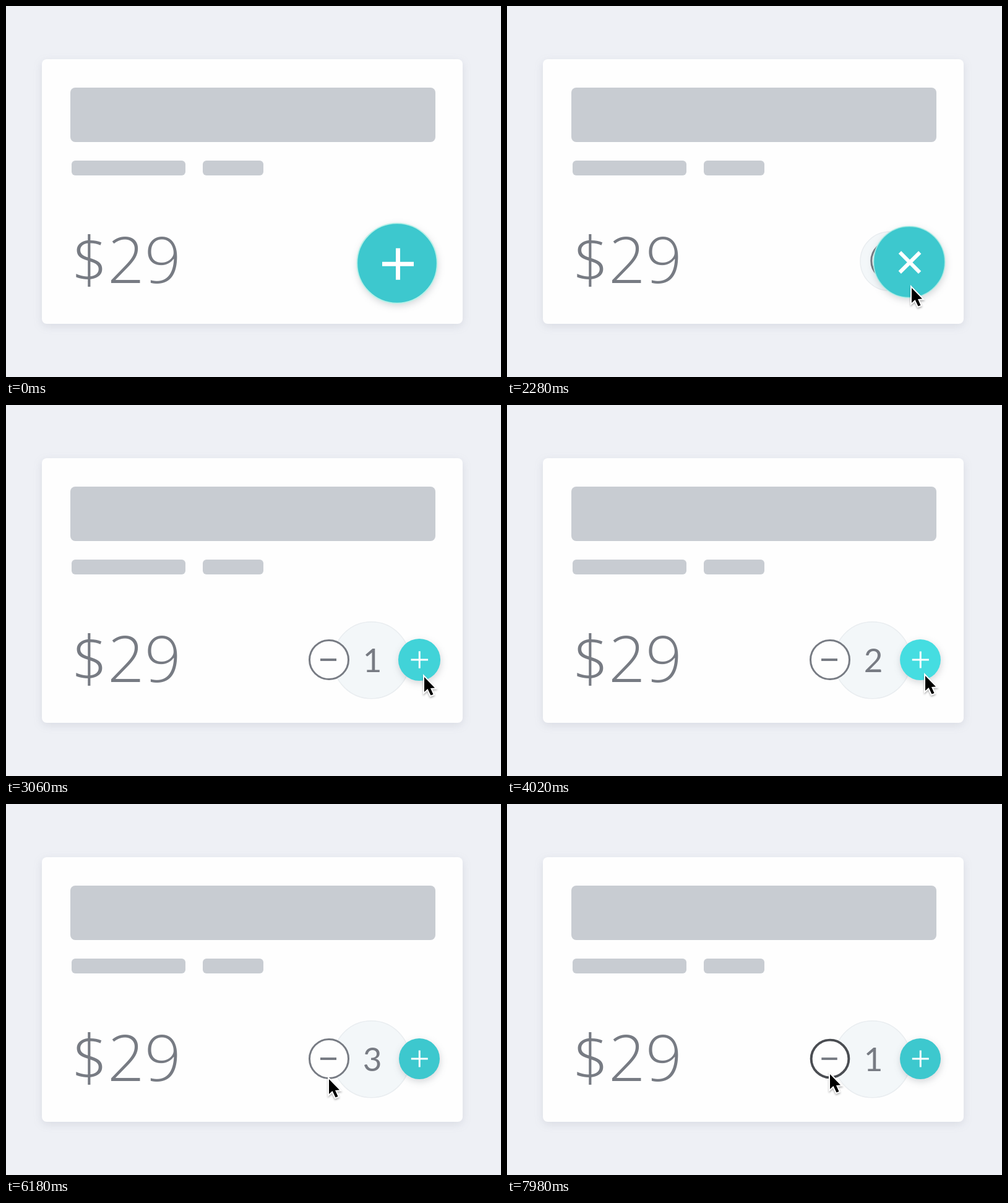
Write an HTML page that moves like this. It is 800 by 600 pixels and loops after 8000 ms.

```html
<!DOCTYPE html>
<html lang="en">
<head>
<meta charset="utf-8">
<title>Quantity button</title>
<style>
  html, body { margin: 0; width: 100%; height: 100%; overflow: hidden; background: #eef0f5; }
  svg { display: block; width: 800px; height: 600px; }
  .card { fill: #fefefe; filter: drop-shadow(0 4px 7px rgba(90, 100, 130, .14)); }
  .bar { fill: #c8ccd2; }
  text { fill: #777b83; }
  #price { font: 300 104px "Open Sans", sans-serif; }
  #count { font: 400 53px Lato, sans-serif; text-anchor: middle; }
  #halo { fill: #f3f7f9; stroke: #e9edf0; stroke-width: 1.5; }
  #ring { fill: #fefefe; }
  #minusSign { fill: #777b83; }
  #disc { filter: drop-shadow(1px 4px 6px rgba(50, 60, 75, .2)); }
  #rim { fill: none; stroke: #b9f1e8; stroke-width: 1.8; }
  #cross { stroke: #fff; }
  #cursor { fill: #000; stroke: #fff; stroke-width: 4; paint-order: stroke;
    filter: drop-shadow(0 2px 1.5px rgba(0, 0, 0, .3)); }
</style>
</head>
<body>
<svg viewBox="0 0 800 600">
  <rect class="card" x="58" y="86" width="680" height="428" rx="8"/>
  <rect class="bar" x="104" y="132" width="590" height="88" rx="8"/>
  <rect class="bar" x="106" y="250" width="184" height="24" rx="6"/>
  <rect class="bar" x="318" y="250" width="98" height="24" rx="6"/>
  <text id="price" x="105" y="448">$29</text>
  <circle id="halo"/>
  <text id="count" x="592" y="432">1</text>
  <g id="minus">
    <circle id="ring"/>
    <rect id="minusSign" x="-14" y="-2" width="26" height="4"/>
  </g>
  <g id="plus">
    <circle id="disc"/>
    <circle id="rim"/>
    <path id="cross"/>
  </g>
  <path id="cursor" d="M0 0V24L5.5 19L10.5 29.5L14.5 28L10 18L17 17.5Z"/>
</svg>
<script>
const LOOP = 8000;
const $ = id => document.getElementById(id);
const set = (id, attrs) => {
  for (const name in attrs) $(id).setAttribute(name, attrs[name]);
};
const mix = (a, b, k) => a + (b - a) * k;
const mixColor = (a, b, k) => `rgb(${a.map((v, i) => mix(v, b[i], k))})`;
const ramp = (t, from, to) => {
  const k = Math.min(1, Math.max(0, (t - from) / (to - from)));
  return k * k * (3 - 2 * k);
};
// Rises and falls once around a click
const press = (t, start) => ramp(t, start, start + 120) - ramp(t, start + 120, start + 340);

// Pointer tip: time, x, y
const path = [
  [0, 860, 552], [440, 804, 544], [820, 770, 540], [1440, 674, 478], [1660, 654, 456],
  [2480, 654, 456], [3060, 676, 440], [3280, 676, 438], [5420, 676, 438],
  [5760, 618, 482], [6180, 522, 445], [6460, 522, 437], [LOOP, 522, 437]
];

// Monotone cubic through the path, so that rests stay still
function along(t, axis) {
  const slope = i => path[i + 1] && path[i]
    ? (path[i + 1][axis] - path[i][axis]) / (path[i + 1][0] - path[i][0]) : 0;
  const tangent = i => {
    const a = slope(i - 1), b = slope(i);
    return a * b > 0 ? 2 * a * b / (a + b) : 0;
  };
  let i = 0;
  while (i < path.length - 2 && t >= path[i + 1][0]) i++;
  const span = path[i + 1][0] - path[i][0];
  const u = (t - path[i][0]) / span, v = 1 - u;
  return v * v * (1 + 2 * u) * path[i][axis] + u * u * (3 - 2 * u) * path[i + 1][axis]
    + span * u * v * (v * tangent(i) - u * tangent(i + 1));
}

function draw(t) {
  const move = ramp(t, 2060, 2500);
  const shrink = ramp(t, 2160, 2560);
  const spread = ramp(t, 2130, 2530);
  const slide = ramp(t, 2200, 2600);

  const hover = ramp(t, 1340, 1620) - ramp(t, 1960, 2200)
    + ramp(t, 2860, 3240) - ramp(t, 5480, 5800);
  const push = press(t, 1860) + press(t, 3820) + press(t, 4670);
  const r = mix(65, 33, shrink) + hover * mix(3, 2, shrink) - push * 3;
  const arm = mix(25.5, 13.5, shrink) * (1 + hover * .04 - push * .05);
  set("plus", { transform: `translate(${mix(632, 668, move)} ${mix(416, 412, move)})` });
  set("disc", { r, fill: mixColor([61, 200, 206], [69, 221, 225], hover) });
  set("rim", { r: r - .3, opacity: 1 - shrink });
  set("cross", {
    d: `M${-arm} 0H${arm}M0 ${-arm}V${arm}`,
    "stroke-width": mix(7, 3, shrink),
    transform: `translate(${mix(1.5, .3, move)} ${mix(1.3, 0, move)}) rotate(${90 * move})`
  });

  set("halo", { cx: mix(632, 590.5, spread), cy: 412.8, r: mix(41, 62, spread) });

  const dark = ramp(t, 6290, 6470);
  const dip = press(t, 6900) + press(t, 7740);
  const line = mix(3, 4, dark);
  set("minus", { transform: `translate(${mix(632, 522, slide)} 412) scale(${1 - .05 * dip})` });
  set("ring", {
    r: 33 - line / 2,
    "stroke-width": line,
    stroke: mixColor([119, 123, 131], [74, 77, 82], dark)
  });

  const clicks = [3900, 4750, -6980, -7820];
  $("count").textContent = clicks.reduce((n, c) => n + (t >= Math.abs(c) ? Math.sign(c) : 0), 1);
  set("count", { opacity: ramp(t, 2380, 2620) });

  set("cursor", { transform: `translate(${along(t, 1)} ${along(t, 2)})` });
}

const start = performance.now();
function tick() {
  draw((performance.now() - start) % LOOP);
  requestAnimationFrame(tick);
}
tick();
</script>
</body>
</html>
```
